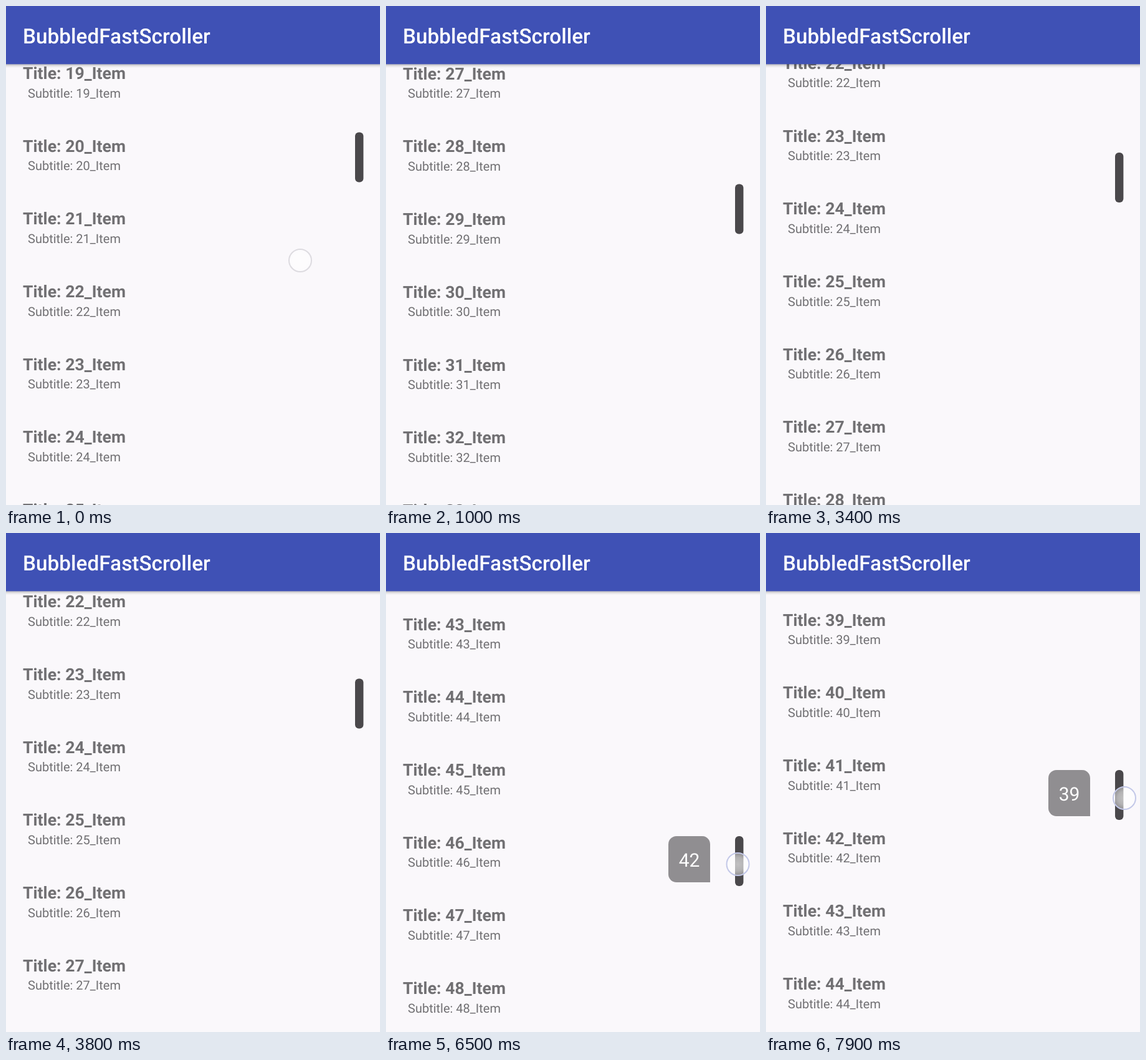
Recreate the animation shown at these times as an HTML page. Size 600 px wide and 800 px high, loop 8000 ms.

```html
<!DOCTYPE html>
<html lang="en">
<head>
<meta charset="utf-8">
<title>Fast scroller</title>
<style>
  html, body { margin: 0; width: 100%; height: 100%; overflow: hidden; background: #faf8fb; }
  svg { display: block; width: 100vw; height: 100vh; font-family: Roboto, sans-serif; text-rendering: geometricPrecision; }
  .title { font-size: 26.67px; font-weight: 700; fill: #717073; }
  .sub { font-size: 20px; fill: #717073; }
</style>
</head>
<body>
<svg viewBox="0 0 600 800">
  <defs>
    <linearGradient id="shade" x1="0" y1="0" x2="0" y2="1">
      <stop offset="0" stop-color="#000" stop-opacity=".3"/>
      <stop offset=".4" stop-color="#000" stop-opacity=".1"/>
      <stop offset="1" stop-color="#000" stop-opacity="0"/>
    </linearGradient>
    <radialGradient id="glow">
      <stop offset="0" stop-color="#fff" stop-opacity=".66"/>
      <stop offset=".6" stop-color="#fff" stop-opacity=".58"/>
      <stop offset="1" stop-color="#fff" stop-opacity=".4"/>
    </radialGradient>
  </defs>
  <rect width="600" height="800" fill="#faf8fb"/>
  <g id="list"></g>
  <rect y="93.3" width="600" height="6" fill="url(#shade)"/>
  <rect width="600" height="93.3" fill="#3f51b5"/>
  <text x="27" y="59.5" font-size="33.33" font-weight="500" fill="#fff">BubbledFastScroller</text>
  <rect id="handle" x="560" width="13.4" height="80" rx="6" fill="#4a484b"/>
  <g id="bubble">
    <path d="M13 0H54A13 13 0 0 1 67 13V74H13A13 13 0 0 1 0 61V13A13 13 0 0 1 13 0Z" fill="#908e91"/>
    <text id="count" x="33.5" y="49" font-size="30" text-anchor="middle" fill="#fff"></text>
  </g>
  <circle id="touch" r="18" fill="url(#glow)" stroke-width="2"/>
</svg>
<script>
const LOOP = 8000, STEP = 100, ROW = 116.68, ROWS = 9;
const GRAB = 4700, DRAG = 4800, TURN = 6900;
const $ = id => document.getElementById(id);

function addText(cls, x) {
  const el = document.createElementNS('http://www.w3.org/2000/svg', 'text');
  el.setAttribute('class', cls);
  el.setAttribute('x', x);
  return $('list').appendChild(el);
}
const rows = Array.from({ length: ROWS }, () => [addText('title', 27), addText('sub', 35)]);

const clamp = v => Math.max(0, Math.min(1, v));

// Linear interpolation through [time, value] points
function track(t, points) {
  if (t <= points[0][0]) return points[0][1];
  for (let i = 1; i < points.length; i++) {
    const [t0, v0] = points[i - 1], [t1, v1] = points[i];
    if (t <= t1) return v0 + (v1 - v0) * (t - t0) / (t1 - t0);
  }
  return points[points.length - 1][1];
}

const fling = (t, start, end, from, to, power) =>
  to + (from - to) * Math.pow(1 - clamp((t - start) / (end - start)), power);

// Scroll position, in rows above the top edge
function scrollAt(t) {
  if (t < 2600) return fling(t, 0, 1500, 19.27, 27.31, 4.7);
  if (t < DRAG) return fling(t, 2600, 3800, 27.31, 22.25, 3.15);
  if (t < 5200) return 20;
  // Dragging reveals the wanted row: at the bottom going down, at the top going up
  if (t <= TURN) {
    const row = Math.round(track(t, [[5400, 23], [6500, 48], [TURN, 51]]));
    return Math.max(19, row - 5.06);
  }
  return Math.min(45.94, Math.round(track(t, [[TURN, 51], [7900, 39]])));
}

function handleAt(t, scroll) {
  if (t < DRAG) return 2 + 10.4 * scroll;
  return track(t, [[DRAG, 233.4], [5200, 233.4], [5400, 230], [6500, 486], [TURN, 515], [7900, 380]]);
}

function touchAt(t, handle) {
  if (t < 300) return { x: 472, y: 408 - t * .3, a: 1 - t / 200, ring: '#dddbe0' };
  if (t >= 2700 && t < 3000) {
    const d = t - 2700;
    return { x: 450, y: 400 + d * .7, a: 1 - d / 300, ring: '#dddbe0' };
  }
  if (t < GRAB) return { x: 0, y: 0, a: 0, ring: 'none' };
  return {
    x: track(t, [[5200, 567], [5400, 567.5], [6000, 571], [6500, 564.5], [TURN, 566], [7800, 573], [7900, 575]]),
    y: t < 5600 ? track(t, [[5200, 302], [5400, 300], [5600, 321]]) : handle + 45,
    a: track(t, [[GRAB - 100, 0], [4900, 1]]),
    ring: '#c3c8e8'
  };
}

function render(t) {
  const scroll = scrollAt(t), handle = handleAt(t, scroll), touch = touchAt(t, handle);
  const first = Math.floor(scroll);

  rows.forEach(([title, sub], k) => {
    const i = first + k, y = 148.6 + ROW * (i - scroll);
    title.textContent = `Title: ${i}_Item`;
    sub.textContent = `Subtitle: ${i}_Item`;
    title.setAttribute('y', y);
    sub.setAttribute('y', y + 29.6);
  });

  $('handle').setAttribute('y', handle);
  $('handle').setAttribute('opacity', track(t, [[2000, 1], [2500, 0], [2600, 0], [2800, 1]]));

  $('bubble').setAttribute('transform', `translate(453 ${handle})`);
  $('bubble').setAttribute('opacity', track(t, [[GRAB, 0], [5000, 1]]));
  $('count').textContent = first;

  $('touch').setAttribute('cx', touch.x);
  $('touch').setAttribute('cy', touch.y);
  $('touch').setAttribute('opacity', clamp(touch.a));
  $('touch').setAttribute('stroke', touch.ring);
}

function tick() {
  render(Math.floor(performance.now() % LOOP / STEP) * STEP);
  requestAnimationFrame(tick);
}
tick();
</script>
</body>
</html>
```
